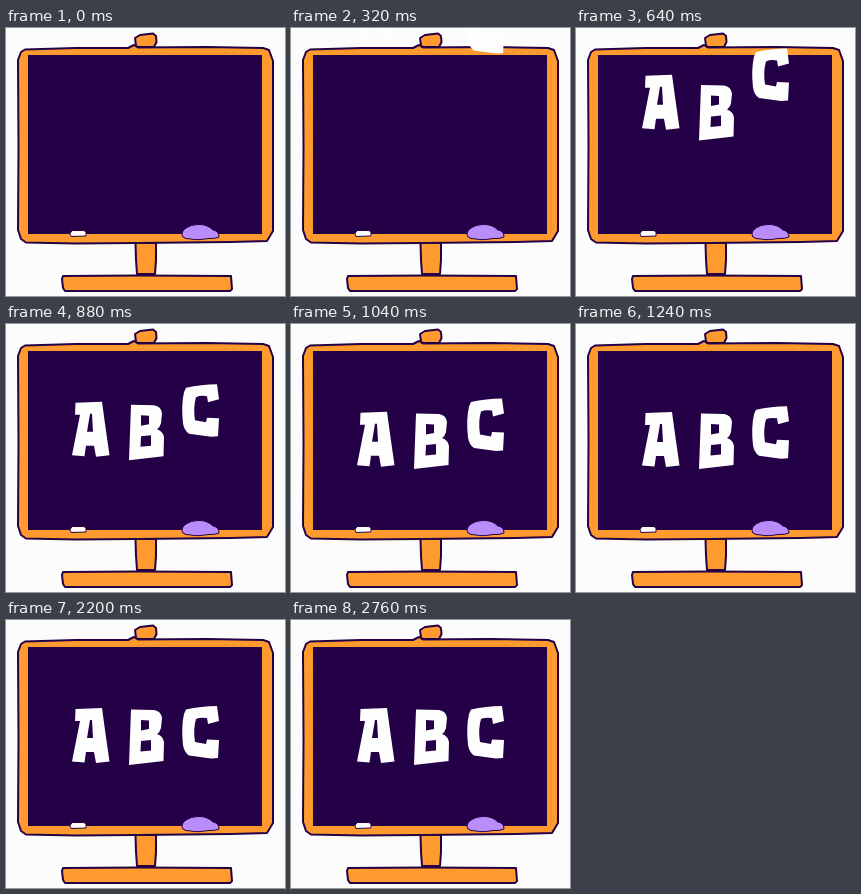
These frames come from a looping animation (279x268 px, 2800 ms). An HTML page with a canvas:

```html
<!DOCTYPE html>
<html lang="en">
<head>
<meta charset="utf-8">
<title>Chalkboard letters</title>
<style>
  html, body { margin: 0; width: 100%; height: 100%; overflow: hidden; background: #fcfcfc; }
  canvas { display: block; }
</style>
</head>
<body>
<canvas id="stage" width="279" height="268"></canvas>
<script>
const ctx = document.getElementById('stage').getContext('2d');
const LOOP = 2800;
const INK = '#240046', ORANGE = '#ff9a2e', LILAC = '#bb8cfb', PAPER = '#fcfcfc';

const shapes = {
  frame: 'M19 21.5 L70 20 L122 20 L128 17 L132 19.5 L200 19 L257 20 L263 22 L267 33 L267 203 L261 213 L225 214 L130 215 L70 215.5 L20 214.5 L15 211 L12 202 L12.5 120 L12 32 L15 24Z',
  peg: 'M130 18 L129 10 L134 7 L147 5.5 L150 8 L150.5 14 L148 19 L132 19Z',
  post: 'M129.5 215 L130 232 L131 246 L149 246 L150 232 L150 215Z',
  base: 'M57 248 L132 247.5 L225 248 L226 261 L224 263 L59 263 L57 260 L56 251Z',
  chalk: 'M66 202.5 L78 202.5 Q81 204 80 208 L65 208.5 Q62.5 206 66 202.5Z',
  eraser: 'M177 209 Q174 204 180 200 Q185 196.5 192 196.5 Q201 196 207 202 Q213 203 213 209 Q209 211 202 210.5 Q191 212.5 185 211 Q179 211 177 209Z',
  A: 'M69.5 89 L96 88 L99 110 L103.5 141.5 L90 143 L88 132 L80 132 L78.5 142.5 L66 141.5 L74 101 L69 101Z M84 100 L81 118 L87 118 L86 100Z',
  B: 'M125 89.5 L148 90 Q155 91 156 98 L155 108 Q154 112 151 114 Q157 116 158 122 L157.5 141 L123 145Z M135 100 L135 110.5 L143 109 L143 100.5Z M135 121 L134.5 131.5 L145 130.5 L145 120Z',
  C: 'M180 89.5 Q195 86 211 86 L213 101 L202 104 L201 98 Q194 97 190 99 Q187 109 189 122 L200 124 L201 119.5 L213 120 L212 138 L205 138.5 L183 135.5 Q178 132 177 125 Q175 107 178 94Z'
};
const paths = Object.fromEntries(Object.entries(shapes).map(([name, d]) => [name, new Path2D(d)]));

function bounceOut(p) {
  if (p <= 0) return 0;
  if (p >= 1) return 1;
  const n = 7.5625, d = 2.75;
  if (p < 1 / d) return n * p * p;
  if (p < 2 / d) return n * (p - 1.5 / d) ** 2 + 0.75;
  if (p < 2.5 / d) return n * (p - 2.25 / d) ** 2 + 0.9375;
  return n * (p - 2.625 / d) ** 2 + 0.984375;
}

// Height above the resting place, in pixels.
const drop = (start, span, from) => t => from * (1 - bounceOut((t - start) / span));
const glide = t => 130 / (1 + Math.exp((t - 643) / 170));
const letters = [
  ['A', drop(186, 856, 166)],
  ['B', drop(492, 456, 160)],
  ['C', glide]
];

function outlined(name, fill, width = 2) {
  ctx.fillStyle = fill;
  ctx.strokeStyle = INK;
  ctx.lineWidth = width;
  ctx.lineJoin = 'round';
  ctx.fill(paths[name]);
  ctx.stroke(paths[name]);
}

function drawBoard() {
  ctx.fillStyle = PAPER;
  ctx.fillRect(0, 0, 279, 268);
  outlined('base', ORANGE);
  outlined('post', ORANGE);
  outlined('frame', ORANGE);
  outlined('peg', ORANGE);
  ctx.fillStyle = INK;
  ctx.fillRect(22, 27, 234, 179);
  outlined('chalk', '#fff', 1);
  outlined('eraser', LILAC, 1);
}

function draw(t) {
  drawBoard();
  if (t < 240) return;
  ctx.fillStyle = '#fefefe';
  for (const [name, height] of letters) {
    ctx.save();
    ctx.translate(0, -height(t));
    ctx.fill(paths[name], 'evenodd');
    ctx.restore();
  }
}

const begin = performance.now();
function tick() {
  const t = (performance.now() - begin) % LOOP;
  draw(Math.floor(t / 40) * 40);
  requestAnimationFrame(tick);
}
tick();
</script>
</body>
</html>
```
